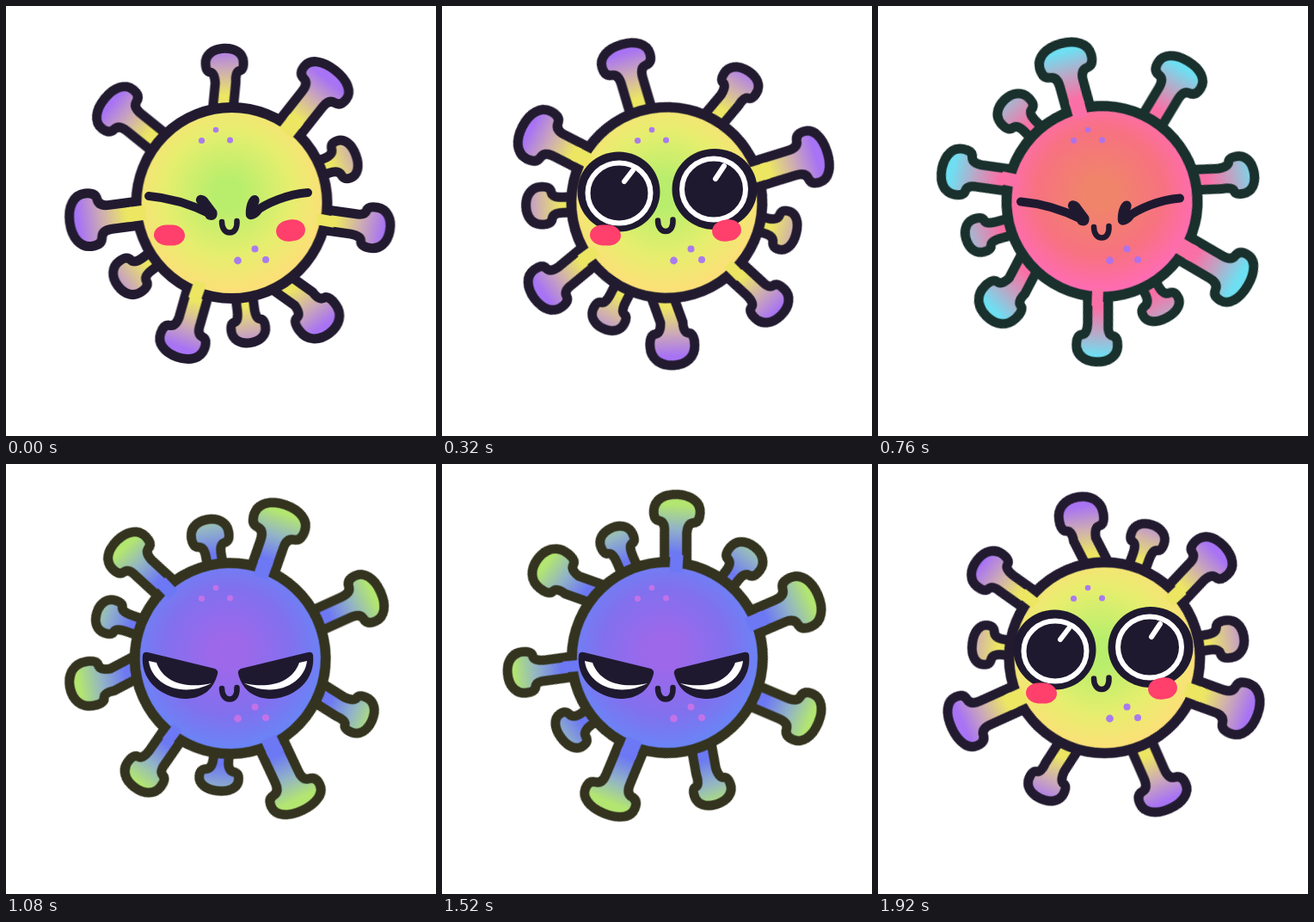
An HTML page that plays this animation: 500 px wide and 500 px high, repeating every 1960 ms.

```html
<!DOCTYPE html>
<html lang="en">
<head>
<meta charset="utf-8">
<title>Spinning virus</title>
<style>
  html, body { margin: 0; width: 100%; height: 100%; overflow: hidden; background: #fff; }
  svg { display: block; width: 100vw; height: 100vh; animation: mood 1960ms -4ms step-end infinite; }
  .spin { animation: spin 1960ms -4ms steps(49) infinite; }
  @keyframes spin { to { transform: rotate(211.7deg); } }

  /* palette, expression and face offset for each phase */
  @keyframes mood {
    0% {
      --line: #221b30; --core: #b9ee6c; --mid: #e6ee6e; --edge: #fbe077;
      --tip: #a873f4; --cap: #cdacb4; --stem: #ece663; --dot: #a97bee;
      --shut: 1; --glad: 0; --mad: 0; --cheek: 1; --drop: 0px; --lip: 0px;
    }
    16.3%, 83.6% {
      --line: #221b30; --core: #b9ee6c; --mid: #e6ee6e; --edge: #fbe077;
      --tip: #a873f4; --cap: #cdacb4; --stem: #ece663; --dot: #a97bee;
      --shut: 0; --glad: 1; --mad: 0; --cheek: 1; --drop: 0px; --lip: -1.5px;
    }
    32.6% {
      --line: #19302d; --core: #f0846a; --mid: #f77280; --edge: #ff6cb2;
      --tip: #6edff2; --cap: #b9a8c6; --stem: #fa70a6; --dot: #b072e8;
      --shut: 1; --glad: 0; --mad: 0; --cheek: 0; --drop: 6.5px; --lip: 6px;
    }
    48.9% {
      --line: #33331f; --core: #9e68ea; --mid: #8270ee; --edge: #6a84f6;
      --tip: #b3e670; --cap: #92b4c6; --stem: #6c78f4; --dot: #c272e8;
      --shut: 0; --glad: 0; --mad: 1; --cheek: 0; --drop: 0px; --lip: 10px;
    }
    100% { --shut: 1; }
  }

  .core { stop-color: var(--core); }
  .mid { stop-color: var(--mid); }
  .edge { stop-color: var(--edge); }
  .tip { stop-color: var(--tip); }
  .cap { stop-color: var(--cap); }
  .stem { stop-color: var(--stem); }
  .spike { fill: url(#arm); stroke: var(--line); stroke-width: 11; stroke-linejoin: round; }
  .ring { fill: none; stroke: var(--line); stroke-width: 12; }
  .dots { fill: var(--dot); }
  .shut { opacity: var(--shut); transform: translateY(var(--drop)); }
  .glad { opacity: var(--glad); }
  .mad { opacity: var(--mad); }
  .cheeks { opacity: var(--cheek); fill: #ff3f6c; }
  .mouth { transform: translateY(var(--lip)); stroke-width: 6.5; }
  .ink { fill: #1f1930; }
  .pen { fill: none; stroke: #1f1930; stroke-linecap: round; stroke-linejoin: round; }
  .shine { fill: none; stroke: #fff; stroke-width: 6; stroke-linecap: round; }
</style>
</head>
<body>
<svg viewBox="0 0 500 500">
  <defs>
    <radialGradient id="skin" gradientUnits="userSpaceOnUse" cx="258" cy="218" r="118">
      <stop class="core" offset=".15"/>
      <stop class="mid" offset=".62"/>
      <stop class="edge" offset=".95"/>
    </radialGradient>
    <linearGradient id="arm" gradientUnits="userSpaceOnUse" x1="0" y1="-188" x2="0" y2="-108">
      <stop class="tip" offset=".1"/>
      <stop class="cap" offset=".44"/>
      <stop class="stem" offset=".8"/>
    </linearGradient>
    <g id="glare">
      <path class="ink" d="M159 222 Q160 218 165 219 L243 238 Q247 240 246 244 C241 263 228 273 207 273 C178 271 156 250 159 222Z"/>
      <path fill="#fff" d="M166 229 C169 256 204 273 239 255 C212 261 184 256 175 231Z"/>
    </g>
  </defs>

  <g transform="translate(262.5 227)"><g class="spin" id="arms"></g></g>
  <circle cx="262.5" cy="227" r="109" fill="url(#skin)"/>
  <g transform="translate(262.5 227)">
    <g class="spin" id="joints"><circle class="ring" cy="2" r="111"/></g>
  </g>

  <g class="dots">
    <circle cx="244" cy="144" r="3.3"/>
    <circle cx="227.5" cy="156.5" r="3.6"/>
    <circle cx="260.5" cy="156" r="3.5"/>
    <circle cx="289.5" cy="282.5" r="4"/>
    <circle cx="269.5" cy="296" r="4.4"/>
    <circle cx="302" cy="295" r="4"/>
  </g>

  <g class="shut">
    <path class="pen" stroke-width="10" d="M166 221 C190 223 216 231 238 242 M351 217 C328 219 304 228 287 241"/>
    <path class="ink" d="M221 227 C220 218 231 217 236 226 L245 238 C248 247 240 252 233 247Z"/>
    <path class="ink" d="M279 244 C278 231 283 220 289 220 C295 220 296 227 293 231 L298 239 C292 249 281 251 279 244Z"/>
  </g>

  <g class="glad">
    <ellipse class="ink" cx="205.5" cy="216" rx="48" ry="46.5"/>
    <ellipse class="ink" cx="317" cy="213" rx="49.5" ry="47"/>
    <ellipse class="shine" cx="206" cy="217.5" rx="36.5" ry="35"/>
    <ellipse class="shine" cx="316" cy="213" rx="37" ry="35.5"/>
    <path class="shine" d="M222 191 L212 204 M328 186 L318 201"/>
  </g>

  <g class="mad">
    <use href="#glare"/>
    <use href="#glare" transform="translate(516 0) scale(-1 1)"/>
  </g>

  <path class="pen mouth" d="M251 251 C251 259 255 263.500 260 263.500 C266 263.500 269 258 268.500 250"/>

  <g class="cheeks">
    <rect x="172" y="254.500" width="36" height="24" rx="15" ry="12" transform="rotate(2 190 266)"/>
    <rect x="314" y="248.500" width="34" height="25" rx="15" ry="12.500" transform="rotate(-8 331 261)"/>
  </g>
</svg>
<script>
  // angle, tip radius, cap half-width, stem half-width, cap base radius, foot shift, opens into body
  const spikes = [
    [-3, 178, 22, 12, 150, -6, 0],
    [38.3, 194, 31, 15, 163, 0, 1],
    [69.5, 154, 23, 9, 129, 0, 0],
    [100.6, 187, 24, 12, 155, 2, 1],
    [143.6, 191, 26, 13, 153, 14, 0],
    [172.6, 166, 20, 10, 139, 0, 0],
    [199.4, 192, 27, 13, 159, 3, 1],
    [233.4, 165, 22, 9, 134, 0, 0],
    [262.6, 190, 31, 14, 154, 0, 1],
    [308.9, 190, 29, 13, 158, 0, 0]
  ];

  function add(parent, tag, attrs) {
    const el = document.createElementNS("http://www.w3.org/2000/svg", tag);
    for (const key in attrs) el.setAttribute(key, attrs[key]);
    document.getElementById(parent).append(el);
  }

  function mushroom(tip, cap, stem, base, foot) {
    const lip = (stem + cap) / 2;
    const side = base + (tip - base) * 0.4;
    const dome = side + (tip - side) * 0.6;
    return `M${foot - stem} -98 L${-stem} ${12 - base} Q${-stem} ${-base} ${-lip} ${-base - 1}
      C${-cap} ${-base - 2} ${-cap} ${-side + 3} ${-cap} ${-side}
      C${-cap} ${-dome} ${-cap * 0.6} ${-tip} 0 ${-tip}
      C${cap * 0.6} ${-tip} ${cap} ${-dome} ${cap} ${-side}
      C${cap} ${-side + 3} ${cap} ${-base - 2} ${lip} ${-base - 1}
      Q${stem} ${-base} ${stem} ${12 - base} L${foot + stem} -98Z`;
  }

  for (const [angle, tip, cap, stem, base, foot, open] of spikes) {
    const transform = `rotate(${angle})`;
    add("arms", "path", { class: "spike", d: mushroom(tip, cap, stem, base, foot), transform });
    if (open) {
      const half = stem - 5.5;
      add("joints", "rect", { x: foot - half, y: -122, width: 2 * half, height: 21, fill: "url(#arm)", transform });
    }
  }
</script>
</body>
</html>
```
